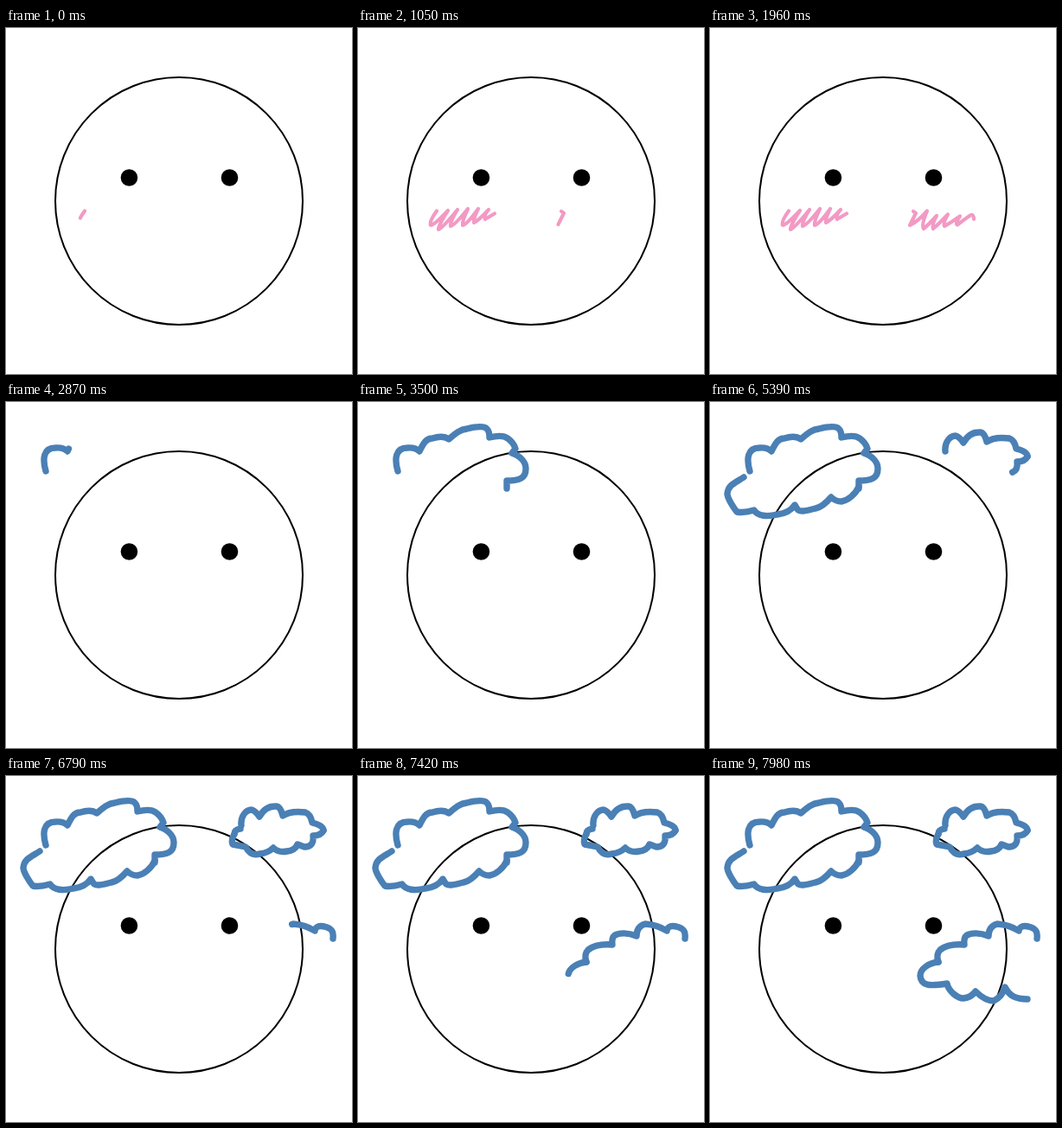
These frames come from a looping animation (400 by 400 pixels, 8000 ms). An HTML page:

```html
<!DOCTYPE html>
<html lang="en">
<head>
<meta charset="utf-8">
<title>Doodle face</title>
<style>
  html, body { margin: 0; width: 100%; height: 100%; overflow: hidden; background: #fff; }
  svg { display: block; width: 100vw; height: 100vh; }
  path { fill: none; stroke-linecap: round; stroke-linejoin: round; }
</style>
</head>
<body>
<svg id="stage" viewBox="0 0 400 400">
  <circle cx="200" cy="200" r="143" fill="none" stroke="#000" stroke-width="2"/>
  <circle cx="142.4" cy="173" r="9.8"/>
  <circle cx="258.5" cy="173" r="9.8"/>
</svg>
<script>
const LOOP = 8000, STEP = 70, CLEAR = 2450;
const PINK = { color: '#f29ac4', width: 4.2, end: CLEAR };
const BLUE = { color: '#4a80b5', width: 7.4, end: LOOP };
const stage = document.getElementById('stage');

// Each stroke: pen, start time, number of steps, path, pace exponent
const strokes = [
  // blush
  stroke(PINK, 0, 9,
    'M91 211.500Q82 224 84 228Q88 228 104 211Q93 228 93 233Q98 231 115 210' +
    'Q106 225 107 229Q112 228 127 209Q120 224 121 228Q126 227 139 209' +
    'Q133 221 134 225Q139 223 151 210Q145 217 147 221Q152 218 158 214.500'),
  stroke(PINK, 980, 15,
    'M235 212L238 214L231 228Q240 224 251 211.500Q244 228 247 232' +
    'Q252 228 262 217Q256 228 258 232Q264 227 275 215.500Q269 226 271 229' +
    'Q277 226 289 217.500Q283 226 286 227.500Q293 222 301 216.500Q305 215 305 221'),
  // left cloud
  stroke(BLUE, 2730, 12,
    'M46 80C42 66 43 53 57 53Q66 52 71 57C76 47 79 42 86 42Q98 38 105 43' +
    'C112 37 117 32 126 31C138 28 146 28 149 31Q152 34 152 41' +
    'C160 39 168 38 173 42Q180 47 182 54L178 59' +
    'C186 62 194 68 194 77C194 88 187 91 172 91L172 100'),
  stroke(BLUE, 3570, 10,
    'M172 98C168 107 159 114 152 115Q145 115 140 110C134 117 128 122 122 123' +
    'C111 126 105 127 102 125Q100 123 98 119C94 125 87 129 78 130' +
    'C66 133 55 132 51 125C44 127 36 128 31 127C27 122 20 111 20 106' +
    'C21 96 28 94 39 87'),
  // right cloud
  stroke(BLUE, 4410, 12,
    'M272 57C271 47 277 39 284 39Q288 40 293 47C298 38 305 35 311 35' +
    'Q317 34 320 46C327 41 338 41 346 42Q352 44 354 54C362 56 367 59 367 63', 1.2),
  stroke(BLUE, 5250, 12,
    'M367 63Q364 69 355 69C356 77 353 82 345 82L337 79Q334 86 325 87' +
    'Q315 89 309 83Q303 89 293 90Q283 93 277 82Q268 80 262 79Q260 74 264 67'),
  stroke(BLUE, 6090, 2, 'M264 67Q264 62 271 61'),
  // cheek cloud
  stroke(BLUE, 6510, 12,
    'M378 188C379 179 376 176 368 174Q358 172 357 179Q346 172 332 171' +
    'Q322 174 322 185C312 181 302 181 297 184Q293 187 294 195' +
    'C281 194 271 197 266 201Q261 206 264 215'),
  stroke(BLUE, 7350, 10,
    'M264 215C253 216 243 223 243 231C244 243 254 243 274 240' +
    'C276 249 286 257 293 257Q302 256 307 249C315 257 323 260 328 260' +
    'Q338 255 341 244C346 254 353 258 367 258')
];

function stroke(pen, start, steps, d, pace = 1) {
  const path = document.createElementNS('http://www.w3.org/2000/svg', 'path');
  path.setAttribute('d', d);
  path.setAttribute('stroke', pen.color);
  path.setAttribute('stroke-width', pen.width);
  stage.appendChild(path);
  return { path, start, steps, pace, end: pen.end, length: path.getTotalLength() };
}

function draw(t) {
  for (const s of strokes) {
    const shown = t >= s.start && t < s.end;
    s.path.style.display = shown ? '' : 'none';
    if (!shown) continue;
    const step = Math.min(s.steps, Math.floor((t - s.start) / STEP + 1e-6) + 1);
    const part = ((step - 0.7) / (s.steps - 0.7)) ** s.pace;
    s.path.style.strokeDasharray =
      part < 1 ? `${part * s.length} ${s.length * 2}` : 'none';
  }
}

const begin = performance.now();
function tick() {
  draw((performance.now() - begin) % LOOP);
  requestAnimationFrame(tick);
}
draw(0);
requestAnimationFrame(tick);
</script>
</body>
</html>
```
